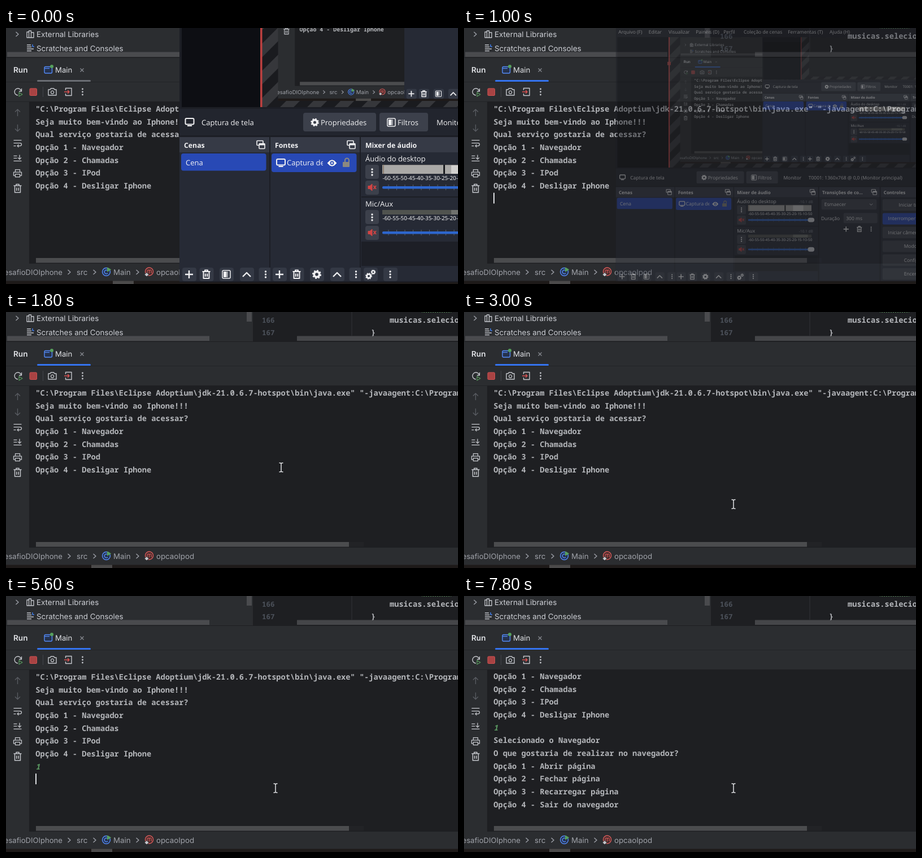
An HTML page that plays this animation: 800 px wide and 453 px high, repeating every 8 s.

```html
<!DOCTYPE html>
<html lang="pt">
<head>
<meta charset="utf-8">
<title>Console</title>
<style>
html,body{margin:0;width:100%;height:100%;overflow:hidden;background:#2b2d30}
svg{display:block;width:100%;height:100%}
text{font-family:Inter,sans-serif;text-rendering:geometricPrecision}
.mono{font-family:"Noto Sans Mono",monospace;font-weight:600}
.obs{font-family:"Open Sans",sans-serif;font-weight:500}
.b{font-weight:700}
</style>
</head>
<body>
<svg id="stage" viewBox="0 0 800 453"></svg>
<script>
const LOOP = 8000, STEP = 200, LINE = 22.65;

const rect = (x, y, w, h, fill, rx = 0, more = '') =>
  `<rect x="${x}" y="${y}" width="${w}" height="${h}" rx="${rx}" fill="${fill}" ${more}/>`;
const text = (x, y, str, size = 13.4, fill = '#ced0d6', cls = '', more = '') =>
  `<text x="${x}" y="${y}" font-size="${size}" fill="${fill}" class="${cls}" ${more}>${str}</text>`;
const path = (d, stroke, w = 1.3, fill = 'none') =>
  `<path d="${d}" stroke="${stroke}" stroke-width="${w}" fill="${fill}" stroke-linejoin="round"/>`;
const at = (x, y, body) => `<g transform="translate(${x} ${y})">${body}</g>`;
const ui = (x, y, str, cls = '', size = 13, fill = '#f2f2f4') => text(x, y, str, size, fill, 'obs ' + cls);
const mono = (x, y, str, fill = '#b4b6ba', more = '', size = 13.67) => text(x, y, str, size, fill, 'mono', more);

const GREY = '#c4c6cb', WHITE = '#f0f0f2', BLUE = '#2849b5';
const dot = (x, y, r, c) => `<circle cx="${x}" cy="${y}" r="${r}" fill="${c}"/>`;
const dots = (c, gap, r) => [-gap, 0, gap].map(y => dot(0, y, r, c)).join('');
const chevron = path('M-2.5-4 2 0-2.5 4', '#9da0a8', 1.4);
const trash = (c, w = 1.5) => path('M-7-5H7M-2.5-5v-2.5h5V-5M-5-4.5V7H5V-4.5M-1.7-1.5v5.5M1.7-1.5v5.5', c, w);
const gear = (r, c) => `<circle r="${r * .62}" fill="none" stroke="${c}" stroke-width="${r * .5}"/>` +
  `<circle r="${r * .9}" fill="none" stroke="${c}" stroke-width="${r * .35}" stroke-dasharray="${r * .36} ${r * .347}"/>`;

const icon = {
  library: path('M-6-4h3.5v10H-6zM-2.5-6h4v12h-4zM1.5-3H6v9H1.5z', GREY),
  scratch: path('M-6-5h7M-6-1.5h8M-6 2h12M-6 5.5h8', GREY) + path('M4-6v4h3', '#3f7be8', 1.5),
  run: rect(-7, -5.5, 13.5, 11.5, '#25324d', 2, 'stroke="#548af7" stroke-width="1.4"') + path('M-7-2.500H2', '#548af7') + dot(6, -6, 3, '#57a05c'),
  rerun: path('M6-1A6 6 0 1 0 0 6M6.5-6v5H2', GREY, 1.4) + path('M2 1 8 4.5 2 8z', '#57965c', 1.2),
  camera: path('M-7-4h3l1.5-2h5L4-4h3V6H-7z', GREY, 1.4) + path('M0-1.8a2.6 2.6 0 1 0 .1 0z', GREY),
  exit: path('M-4.5-3v-3.5H6v13H-4.5V3', GREY, 1.4) + path('M-7 0H2M-1-3 2 0-1 3', '#e05555', 1.4),
  up: path('M0 6V-6M-4.5-1.5 0-6 4.5-1.5', '#5a5d63'),
  down: path('M0-6V6M-4.5 1.5 0 6 4.5 1.5', '#5a5d63'),
  wrap: path('M-7-5H7M-7 0H4.5a2.5 2.5 0 0 1 0 5H0M2 2.5-.5 5 2 7.5M-7 5h4', GREY),
  end: path('M-7-4h6M-7 0h6M-7 5H7M3.5-6V2M.5-1l3 3 3-3', GREY),
  print: path('M-4-2v-4.5h8V-2M-4 4h-3V-2H7v6H4M-4 1.5h8v5h-8z', GREY),
  main: `<circle r="7" fill="#25324d" stroke="#548af7" stroke-width="1.4"/>` + path('M2.500-2A3.300 3.300 0 1 0 2.500 2.200', '#548af7', 1.4) +
    path('M2-7.500 8-4 2-.5z', '#57a05c', 1, '#57a05c'),
  method: `<circle cx="1" r="7" fill="#402929" stroke="#db5c5c" stroke-width="1.4"/>` +
    path('M-2.5 3v-4.500q0-1.500 1.700-1.500T1-.5v3.500-3.500q0-2.500 1.700-2.500T4.500-1.500V3', '#db5c5c', 1.2) +
    path('M-3.500 1.500.5 5.500-3.500 9-7.500 5.500z', '#2b2d30', 1, GREY),
  plus: path('M0-7V7M-7 0H7', WHITE, 2.4),
  filter: rect(-7, -7, 14, 14, 'none', 2, `stroke="${WHITE}" stroke-width="1.5"`) + rect(-5, -5, 5, 10, WHITE) + rect(0, -5, 3, 10, '#9a9ca3'),
  chevUp: path('M-7 4 0-3 7 4', WHITE, 2.4),
  monitor: rect(-7.5, -6, 15, 10.5, 'none', 2, `stroke="${WHITE}" stroke-width="2"`) + path('M-4 7H4', WHITE, 2),
  popout: rect(-7, -7, 11, 8, 'none', 1, `stroke="${WHITE}" stroke-width="1.6"`) + rect(-3, -2, 10, 9, '#363a46', 1, `stroke="${WHITE}" stroke-width="1.6"`) + rect(-3, -2, 10, 3, WHITE),
  eye: path('M-8 0Q0-10.5 8 0 0 10.5-8 0z', WHITE, 1, WHITE) + dot(0, 0, 3.4, BLUE) + dot(0, 0, 1.7, WHITE),
  lock: rect(-6, -1, 12, 9, '#8b8880', 1) + path('M-2-1v-3a3.5 3.5 0 0 1 7 0v3', '#8b8880', 2),
  mute: path('M-7-2.5h3L0-6V6L-4 2.5h-3z', '#d04444', 1, '#d04444') + path('M2.5-3 7 3M7-3 2.5 3', '#d04444', 1.8),
  more: dots(WHITE, 5, 1.7),
  trash: trash(WHITE, 2),
  gear: gear(7.5, WHITE)
};
const put = (name, x, y) => at(x, y, icon[name]);

function ide() {
  const bar = '#4a4b4e', dark = '#1e1f22', crumb = '#a0a3aa';
  const leftIcons = ['up', 'down', 'wrap', 'end', 'print'];
  return rect(0, -400, 1130, 853, '#2b2d30') +
    at(20, 11, chevron) + put('library', 43, 11) + text(54, 16, 'External Libraries') +
    put('scratch', 43, 35) + text(54, 41, 'Scratches and Consoles') +
    rect(2, 42.5, 358, 8.5, bar) + rect(426, -30, 9, 47, bar) +
    rect(437, -400, 700, 452, dark) + rect(611.5, 0, 1, 42, '#303236') +
    mono(453, 19, '166', '#4b5059', '', 12.5) + mono(453, 41, '167', '#4b5059', '', 12.5) +
    mono(679, 19, 'musicas.selecionar') + mono(646, 41, '}') +
    path('M736 1' + 'l2-2 2 2'.repeat(13), '#4f7d50', 1) +
    rect(515, 42.5, 620, 8.5, '#454649') + rect(0, 52, 1130, 1, dark) +
    text(13, 79, 'Run', 13.6, '#dfe1e5', '', 'font-weight="600"') + put('run', 75, 74) + text(87, 79, 'Main', 13.2, '#dfe1e5') +
    at(134.5, 74.5, path('M-3-3 3 3M3-3-3 3', '#8b8e95', 1.1)) +
    rect(0, 95, 1130, 1, '#222427') + '<rect id="underline" x="55" y="92" width="95" height="3" rx="1.5"/>' +
    put('rerun', 21, 113) + rect(42, 107, 12.5, 12.5, '#a84343', 1.5, 'stroke="#d05252"') +
    rect(65, 104, 1, 18, '#43454a') + put('camera', 82, 113) + put('exit', 110, 113) +
    at(135.5, 113, dots(GREY, 5, 1.4)) +
    rect(41, 130, 1090, 287, dark) + rect(0, 130, 41, 1, '#222427') +
    leftIcons.map((n, i) => put(n, 20.5, 150 + i * 26.8)).join('') + at(20.5, 284, trash(GREY)) +
    '<g clip-path="url(#console)"><g id="lines"></g></g>' +
    rect(607, 407, 26, 8.5, '#222326') + rect(53, 407, 554, 8.5, '#4b4c4e') +
    text(100, 436.5, 'DesafioDIOIphone', 13.1, crumb, '', 'text-anchor="end"') +
    [112, 157, 233].map(x => at(x, 432, chevron)).join('') +
    text(125, 436.5, 'src', 13.3, crumb) + put('main', 177.5, 431.5) + text(190, 436.5, 'Main', 13.3, crumb) +
    put('method', 252.5, 431) + text(266, 436.5, 'opcaoIpod', 13.3, crumb) +
    rect(0, 447.5, 1130, 6, '#1e1a19') + '<rect id="task" y="447.5" width="37" height="6" fill="#4b4a4a"/>';
}

const button = (x, y, w, h, fill = '#3c404b') => rect(x, y, w, h, fill, 4);
const dock = (x, w, title) => rect(x, 193, w, 255, '#262a35') + rect(x, 193, w, 27, '#363a46') +
  ui(x + 8, 212, title, 'b', 12.3) + put('popout', x + w - 15, 206.5);

function tools(x, names) {
  const gaps = [0, 30.5, 66, 102, 135.5];
  return names.map((n, i) => button(x + gaps[i] - 12, 424, 25, 24, '#343945') + put(n, x + gaps[i], 436)).join('');
}

function channel(y, name, lit) {
  const scale = Array.from({length: 13}, (_, i) => i < 12 ? -60 + 5 * i : 0).join('');
  const ticks = Array.from({length: 11}, (_, i) => `M${677 + i * 14.5} ${y + 46}v10`).join('');
  return ui(636, y + 5, name) + ui(804, y + 5, '-10.1 dB', '', 10, '#8b8e98') +
    button(636, y + 11, 24, 25) + put('more', 648, y + 24) +
    button(636, y + 39, 24, 25) + put('mute', 648, y + 51) +
    (lit ? rect(666, y + 11, 172, 16, '#aaa9a7') + rect(788, y + 11, 28, 16, '#d2d1cf') +
           rect(666, y + 11, 172, 1, '#85837f') + '<rect id="peak" y="242" width="3" height="16" fill="#1b1c20"/>' + rect(667, y + 11, 2, 16, '#8d7e70')
         : rect(666, y + 11, 172, 8, '#50534f') + rect(788, y + 11, 40, 8, '#70726e')) +
    ui(666.5, y + (lit ? 38 : 29), scale, '', 9.9, '#fff') +
    path(ticks, '#59606f', 1) + rect(666, y + 49, 172, 4.5, '#2d66cd', 2) + rect(828, y + 45, 18, 12, '#d5d6da', 6);
}

function docks() {
  const side = ['Iniciar transmissão', 'Interromper gravação', 'Iniciar câmera virtual', 'Modo estúdio', 'Configurações', 'Encerrar'];
  return rect(307, 140, 820, 308, '#1c1e25') + rect(307, 143, 820, 47, '#22252e') +
    put('monitor', 325, 166) + ui(346, 171.5, 'Captura de tela') +
    button(526, 150, 129, 33) + at(546.5, 167, gear(6.8, WHITE)) + ui(557, 171.5, 'Propriedades') +
    button(661, 150, 86, 33) + put('filter', 682, 167) + ui(693, 171.5, 'Filtros') +
    ui(762, 171.5, 'Monitor') + ui(830, 171.5, 'T0001: 1360x768 @ 0,0 (Monitor principal)') +
    dock(307, 159, 'Cenas') + rect(310, 222, 150.5, 30.5, BLUE, 4) + ui(318, 242.5, 'Cena') +
    tools(324, ['plus', 'trash', 'filter', 'chevUp', 'more']) +
    dock(468, 158, 'Fontes') + rect(470, 222, 150.5, 33, BLUE, 4) + put('monitor', 486.5, 238) +
    `<g clip-path="url(#label)">${ui(497, 243, 'Captura de tela')}</g>` + put('eye', 577, 239) + put('lock', 602, 238) +
    tools(484, ['plus', 'trash', 'gear', 'chevUp', 'more']) +
    dock(628, 228, 'Mixer de áudio') + channel(231, 'Áudio do desktop', true) + rect(629, 298, 226, 2, '#1c1e25') +
    channel(311, 'Mic/Aux', false) + rect(629, 378, 226, 43, '#1d1f26') +
    button(633, 424, 25, 24, '#343945') + at(642, 439, gear(5.5, WHITE)) + at(650, 432, gear(4, WHITE)) +
    button(668, 424, 25, 24, '#343945') + put('more', 680, 436) +
    dock(859, 164, 'Transições de co...') + button(865, 226, 150, 28) + ui(873, 244, 'Esmaecer') + at(1000, 240, path('M-4-2 0 2 4-2', WHITE)) +
    ui(864, 282, 'Duração') + button(925, 263, 92, 28) + ui(932, 282, '300 ms') +
    put('plus', 932, 307) + put('trash', 968, 307) + put('more', 1000, 307) +
    dock(1026, 130, 'Controles') +
    side.map((s, i) => button(1031, 226 + i * 37.4, 130, 31, i == 1 ? BLUE : '#3c404b') +
      ui(i == 0 ? 1075 : i < 3 ? 1046 : 1089, 246 + i * 37.4, s)).join('');
}

function recorder() {
  const menu = {'Arquivo (F)': 314, Editar: 396, Visualizar: 450, 'Painéis (D)': 524, Perfil: 599, 'Coleção de cenas': 654, 'Ferramentas (T)': 774, 'Ajuda (H)': 887};
  return rect(307, -260, 820, 710, '#1c1e25') +
    Object.entries(menu).map(([s, x]) => ui(x, -223, s)).join('') +
    rect(311, -214, 810, 354, '#0d0e13') + rect(453, -214, 668, 354, 'url(#hatch)') +
    `<g clip-path="url(#preview)"><g transform="translate(481.5 -201) scale(.728)">
      <use href="#ide"/>${rect(307, -260, 820, 400, '#14151a')}${rect(311, 0, 139, 140, '#0d0e13')}
      ${rect(450, -214, 3, 354, '#a83c3c')}${rect(453, -214, 668, 354, 'url(#hatch)')}
      ${rect(481, -214, 640, 343, '#1e1f23')}<use href="#docks"/></g></g>` +
    rect(450, -214, 3.5, 354, '#bd4040') + rect(447, -147, 9, 9, '#bd4040') +
    '<g id="docks">' + docks() + '</g>';
}

const clip = (id, x, y, w, h) => `<clipPath id="${id}">${rect(x, y, w, h, '#000')}</clipPath>`;
document.getElementById('stage').innerHTML = `<defs>
  ${clip('console', 41, 131, 1090, 275)}${clip('label', 497, 225, 64, 30)}${clip('preview', 481, -214, 640, 343)}
  <pattern id="hatch" width="34" height="34" patternUnits="userSpaceOnUse" patternTransform="rotate(45)">
    ${rect(0, 0, 34, 34, '#1a1b1f')}${rect(0, 0, 17, 34, '#36373b')}</pattern></defs>
  <g id="ide">${ide()}</g><rect id="caret" width="2" height="19" fill="#dcdee2"/>
  <g id="recorder">${recorder()}</g>
  <g id="arrow">${path('M0 0V16.5L3.8 13 6.5 19.5 9.3 18.3 6.6 12H11.5z', '#222', .8, '#fff')}</g>
  <g id="beam">${path('M-3.5-8Q0-8 0-6.5 0-8 3.5-8M0-7V7M-3.5 8Q0 8 0 6.5 0 8 3.5 8', '#e4e5e8', 1.5)}</g>`;

const $ = id => document.getElementById(id);
const set = (id, attrs) => Object.entries(attrs).forEach(([k, v]) => $(id).setAttribute(k, v));
const show = (id, on) => { $(id).style.display = on ? '' : 'none'; };

const output = [
  String.raw`"C:\Program Files\Eclipse Adoptium\jdk-21.0.6.7-hotspot\bin\java.exe" "-javaagent:C:\Program Files`,
  'Seja muito bem-vindo ao Iphone!!!', 'Qual serviço gostaria de acessar?',
  'Opção 1 - Navegador', 'Opção 2 - Chamadas', 'Opção 3 - IPod', 'Opção 4 - Desligar Iphone', '1',
  'Selecionado o Navegador', 'O que gostaria de realizar no navegador?', 'Opção 1 - Abrir página',
  'Opção 2 - Fechar página', 'Opção 3 - Recarregar página', 'Opção 4 - Sair do navegador'
];
$('lines').innerHTML = output.map((s, i) => mono(52.3, 148 + i * LINE, s,
  i == 7 ? '#5b9a62' : '#b4b6ba', i == 7 ? 'font-style="italic"' : '')).join('');
const rows = [...$('lines').children];

const FOCUS = 1000, GONE = 1200, TYPED = 5000, ENTER = 5400, REPLY = 5800;
const caretOn = [[1000, 1800], [2400, 3000], [3600, 4200], [4600, 6600], [7200, 7600]];
const pointer = [[1200, 540, 128], [1400, 522, 178], [1600, 501, 238], [1800, 487, 275], [2200, 480, 322], [2400, 477, 340]];
const peaks = [774, 773, 771, 769, 767, 765];

function draw(now) {
  const t = Math.floor(now % LOOP / STEP) * STEP;
  const focused = t >= FOCUS, scroll = t >= REPLY ? 68.9 : 0;

  show('recorder', t < GONE);
  set('recorder', focused ? {transform: 'translate(68.6 155.7) scale(.652)', opacity: .4} : {transform: '', opacity: 1});
  set('underline', {fill: focused ? '#3574f0' : '#6b6e74'});
  set('task', {x: focused ? 151 : 189});
  set('peak', {x: peaks[Math.min(t / STEP, 5)]});

  const count = t >= REPLY ? 14 : t >= TYPED ? 8 : 7;
  rows.forEach((row, i) => { row.style.display = i < count ? '' : 'none'; });
  set('lines', {transform: `translate(0 ${-scroll})`});
  const line = t >= REPLY ? 14 : t >= ENTER ? 8 : 7;
  set('caret', {x: t >= TYPED && t < ENTER ? 60.5 : 52, y: 133 + line * LINE - scroll});
  show('caret', caretOn.some(([from, to]) => t >= from && t < to));

  const pose = pointer.filter(p => p[0] <= t).pop();
  show('arrow', t == GONE);
  show('beam', t > GONE);
  if (pose) ['arrow', 'beam'].forEach(id => set(id, {transform: `translate(${pose[1]} ${pose[2]})`}));
}

const start = performance.now();
(function tick() {
  draw(performance.now() - start);
  requestAnimationFrame(tick);
})();
</script>
</body>
</html>
```
